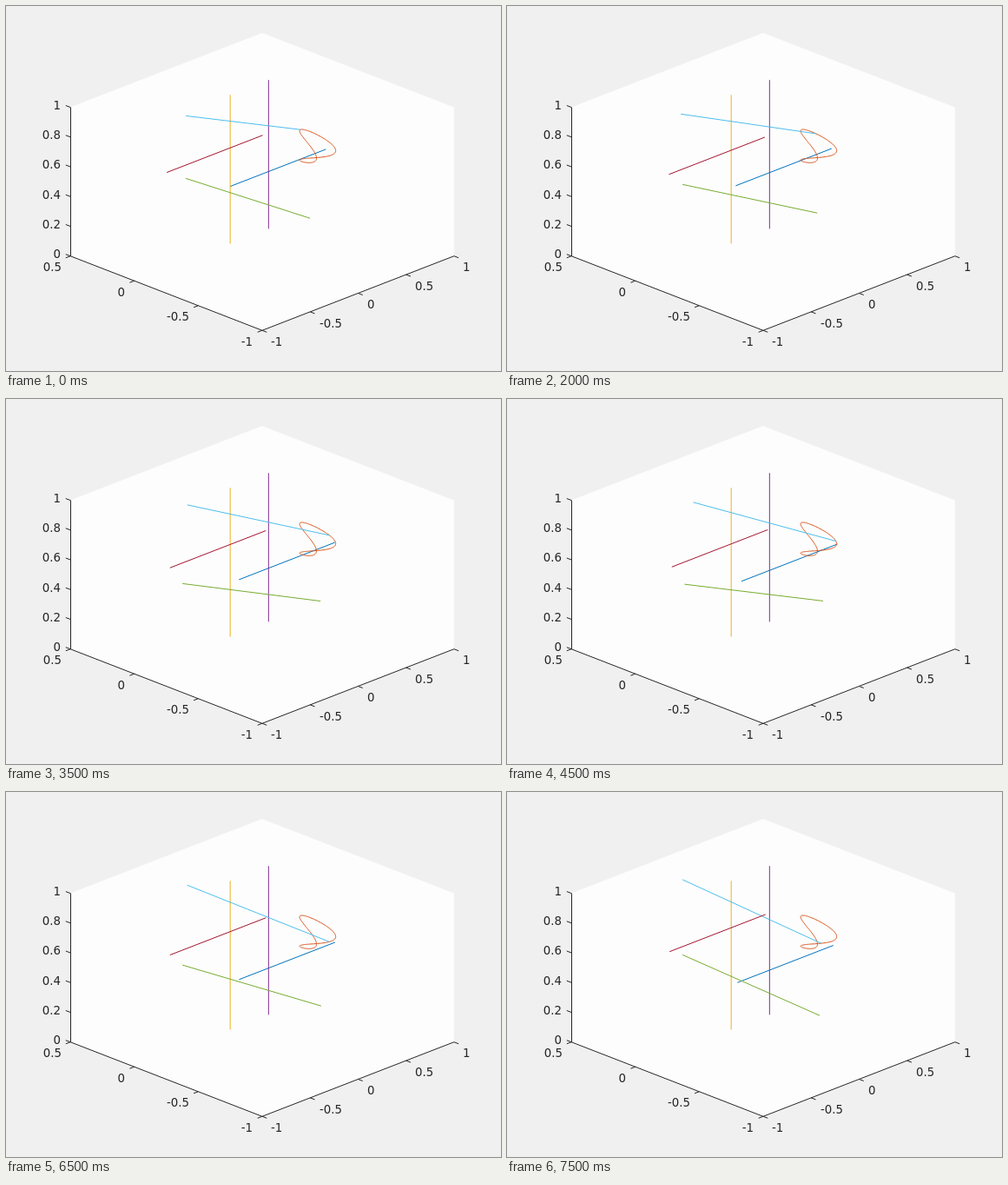
These frames come from a looping animation (570 px wide and 420 px high, 8000 ms). An HTML page:

```html
<!DOCTYPE html>
<html lang="en">
<head>
<meta charset="utf-8">
<title>Swaying struts</title>
<style>
html, body { margin: 0; width: 100%; height: 100%; overflow: hidden; background: #f0f0f0; }
svg { display: block; width: 570px; height: 420px; }
text { font: 13.33px "DejaVu Sans", sans-serif; fill: #262626; }
path { fill: none; stroke-width: 1; }
</style>
</head>
<body>
<svg id="plot" viewBox="0 0 570 420"></svg>
<script>
const NS = "http://www.w3.org/2000/svg";
const STEP = 500, STEPS = 16, STEPS_PER_TURN = 40;
const plot = document.getElementById("plot");

// Isometric view of x -1..1, y -1..0.5, z 0..1
const HALF_WIDTH = 220.88, RISE = 85.58;
function project(x, y, z) {
  const u = (x + 1) / 2, v = (y + 1) / 1.5;
  return [294.98 + HALF_WIDTH * (u - v), 373.3 - RISE * (u + v + 2 * z)];
}

function add(tag, attrs) {
  const node = document.createElementNS(NS, tag);
  for (const key in attrs) node.setAttribute(key, attrs[key]);
  return plot.appendChild(node);
}
const addPath = (stroke, d = "") => add("path", { stroke, d });
const line = (a, b) => `M${a}L${b}`;

function label(value, x, y, anchor) {
  const attrs = { x: Math.round(x), y: Math.round(y), "text-anchor": anchor };
  add("text", attrs).textContent = value;
}

// Walls, axes, ticks and labels
const left = project(-1, 0.5, 0), front = project(-1, -1, 0), right = project(1, -1, 0);
const walls = [left, front, right, project(1, -1, 1), project(1, 0.5, 1), project(-1, 0.5, 1)];
add("polygon", { points: walls.join(" "), fill: "#fdfdfd" });
let axes = line(left, front) + "L" + right + "M74.5 116.5V288";
for (let i = 0; i <= 5; i++) {
  const [x, y] = project(-1, 0.5, i / 5);
  axes += `M${x} ${y}l-5.3 -2`;
  label(i / 5, x - 11, y + 2.3, "end");
}
for (let value = -1; value <= 0.5; value += 0.5) {
  const [x, y] = project(-1, value, 0);
  axes += `M${x} ${y}l-5.3 2`;
  label(value, x - 10.5, y + 17.6, "end");
}
for (let value = -1; value <= 1; value += 0.5) {
  const [x, y] = project(value, -1, 0);
  axes += `M${x} ${y}l5.3 2`;
  label(value, x + 10.5, y + 17.6, "start");
}
addPath("#262626", axes);

// The driven end of the cyan strut runs along this closed curve
const driven = a => project(
  0.2 + 0.1 * Math.sin(a),
  -0.5 + 0.1 * Math.cos(2 * a),
  0.75 + 0.1 * Math.cos(a)
);
const turn = Array.from({ length: 180 }, (_, i) => driven(i * Math.PI / 90));

const blue = addPath("#0072bd");
addPath("#d95319", `M${turn.join("L")}Z`);
addPath("#edb120", line(project(0, 0, 0), project(0, 0, 1)));
addPath("#7e2f8e", line(project(0.4, 0, 0), project(0.4, 0, 1)));
const green = addPath("#77ac30");
const cyan = addPath("#4dbeee");
const red = addPath("#a2142f");

// Other ends sway about their rest place, in pixels per harmonic:
// sin a, cos 2a, cos a, sin 3a
function swaying(rest, ...sways) {
  const home = project(...rest);
  return a => {
    const waves = [Math.sin(a), Math.cos(2 * a), Math.cos(a), Math.sin(3 * a)];
    return home.map((v, axis) => sways.reduce((sum, sway, i) => sum + sway[axis] * waves[i], v));
  };
}
const blueStart = swaying([-0.3, -0.25, 0.5], [4.8, -2.6], [-3.7, 1.4], [-0.2, -8.7]);
const redStart = swaying([-0.3, 0.25, 0.5], [-1.4, 3.5], [-3.1, -2.3], [0, 7.4]);
const cyanStart = swaying([0.2, 0.5, 0.75], [1.4, 8.4], [0.6, 2.3], [0, 16.1], [-7.9, -2.5]);
const greenStart = swaying([0.2, 0.5, 0.25], [-4, 7], [0.4, -9.8], [0, 14.6], [-2.4, -1.2]);
const greenEnd = swaying([0.2, -0.5, 0.25], [7.7, -6.8], [-3.1, 8.6], [-0.7, -15], [0.4, 1.1]);

const bar = `l${HALF_WIDTH / 2} ${-RISE / 2}`;
function draw(time) {
  const a = Math.floor(time / STEP) % STEPS * 2 * Math.PI / STEPS_PER_TURN;
  blue.setAttribute("d", `M${blueStart(a)}${bar}`);
  red.setAttribute("d", `M${redStart(a)}${bar}`);
  green.setAttribute("d", line(greenStart(a), greenEnd(a)));
  cyan.setAttribute("d", line(cyanStart(a), driven(a)));
}

let start;
function tick(now) {
  start ??= now;
  draw(now - start);
  requestAnimationFrame(tick);
}
draw(0);
requestAnimationFrame(tick);
</script>
</body>
</html>
```
